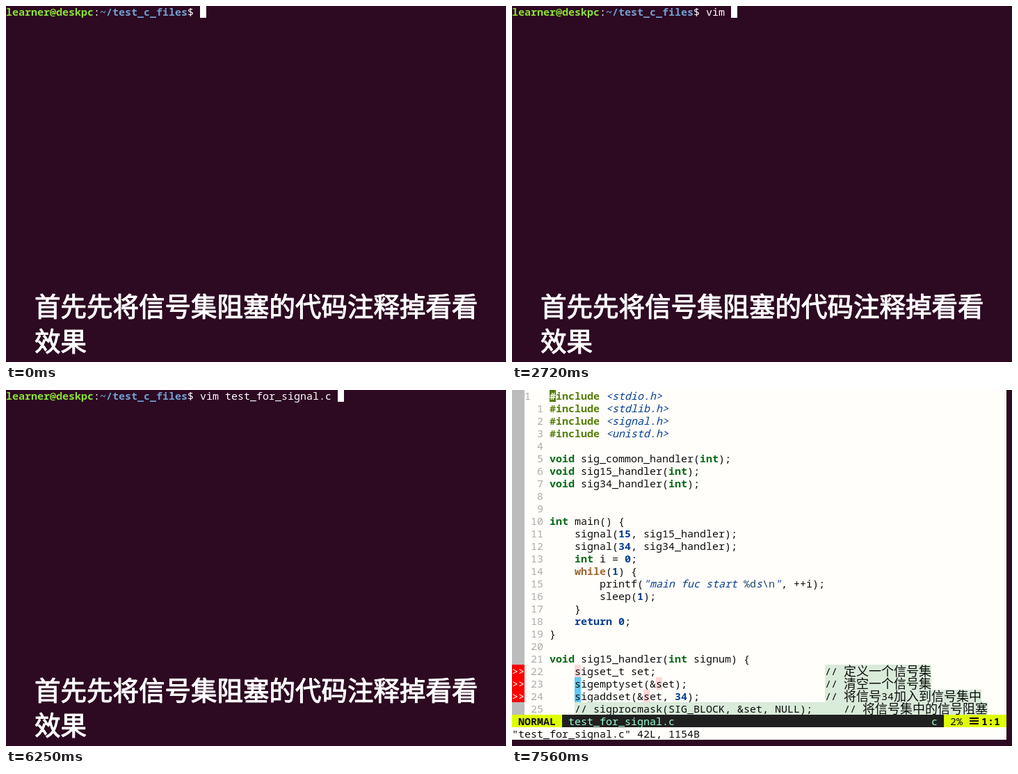
These frames come from a looping animation (719x512 px, 8 s). An HTML page with a canvas:

```html
<!DOCTYPE html>
<html lang="zh">
<head>
<meta charset="utf-8">
<title>Terminal</title>
<style>
html, body { margin: 0; width: 100%; height: 100%; overflow: hidden; background: #2d0922; }
canvas { display: block; }
</style>
</head>
<body>
<canvas id="stage" width="719" height="512"></canvas>
<script>
const ctx = document.getElementById('stage').getContext('2d');
const LOOP = 8000, CW = 9, CH = 18;
const MONO = '"Noto Sans Mono", "DejaVu Sans Mono", monospace';
const CJK = '"Noto Sans CJK SC", "Noto Sans CJK JP", sans-serif';
const DARK = '#2d0922', PAPER = '#fffefa', INK = '#0c0c0c', BLUE = '#083f93', YELLOW = '#dfff00';

const COMMAND = 'vim test_for_signal.c ';
const KEYS = [2320, 2390, 2520, 2720, 3070, 3130, 3330, 3520, 3850, 4050, 4120, 4250,
  4580, 4840, 4970, 5300, 5500, 5570, 5700, 5980, 6110, 6250];
const BACKSPACE = 7100, ENTER = 7370, CLEAR = 7430, EDITOR = 7560;
const CURSOR_OFF = [[190, 790], [1380, 1980], [6840, 7100]];
const POINTER = [[520, 628, 407], [590, 619, 365], [660, 607, 325], [720, 592, 287],
  [790, 579, 264], [920, 572, 255]];
const POINTER_END = 2250;

const STYLES = {
  plain: [INK], include: ['#557f08', 'bold'], string: [BLUE, 'italic'], escape: ['#1d4668'],
  type: ['#066a17', 'bold'], loop: ['#9c6a32', 'bold'], number: [BLUE, 'bold'], comment: [INK]
};

const CODE = String.raw`#include <stdio.h>
#include <stdlib.h>
#include <signal.h>
#include <unistd.h>

void sig_common_handler(int);
void sig15_handler(int);
void sig34_handler(int);


int main() {
    signal(15, sig15_handler);
    signal(34, sig34_handler);
    int i = 0;
    while(1) {
        printf("main fuc start %ds\n", ++i);
        sleep(1);
    }
    return 0;
}

void sig15_handler(int signum) {
    sigset_t set;                           // 定义一个信号集
    sigemptyset(&set);                      // 清空一个信号集
    sigaddset(&set, 34);                    // 将信号34加入到信号集中
    // sigprocmask(SIG_BLOCK, &set, NULL);     // 将信号集中的信号阻塞`.split('\n');

const TOKEN = /(?<comment>\/\/.*)|(?<include>#include)|(?<string><[^>]+>|"[^"]*")|(?<type>\b(?:void|int)\b)|(?<loop>\bwhile\b)|(?<number>\b(?:\d+|return)\b)/g;

const isWide = ch => ch > '\u2fff';
const columns = s => [...s].reduce((n, ch) => n + (isWide(ch) ? 2 : 1), 0);

function rect(x, y, w, h, color) {
  ctx.fillStyle = color;
  ctx.fillRect(x, y, w, h);
}

function cells(col, row, count, color) {
  rect(col * CW, row * CH - 1, count * CW, CH, color);
}

// Draws text on the character grid and returns the next column.
function put(text, col, row, color, face = '') {
  ctx.fillStyle = color;
  for (const ch of text) {
    const wide = isWide(ch);
    ctx.font = wide ? `${face} 18px ${CJK}` : `${face} 15px ${MONO}`;
    ctx.fillText(ch, col * CW, row * CH + (wide ? 15 : 14));
    col += wide ? 2 : 1;
  }
  return col;
}

function tokens(line) {
  const out = [];
  let last = 0;
  for (const m of line.matchAll(TOKEN)) {
    out.push(['plain', line.slice(last, m.index)]);
    const kind = Object.keys(m.groups).find(k => m.groups[k]);
    if (kind === 'string') {
      m[0].split(/(%d|\\n)/).forEach((s, i) => out.push([i % 2 ? 'escape' : 'string', s]));
    } else {
      out.push([kind, m[0]]);
    }
    last = m.index + m[0].length;
  }
  out.push(['plain', line.slice(last)]);
  return out;
}

const LINES = CODE.map(tokens);

function drawCaption() {
  ctx.font = `37.5px ${CJK}`;
  ctx.fillStyle = ctx.strokeStyle = '#fff';
  ctx.lineWidth = 1.1;
  ctx.lineJoin = 'round';
  ['首先先将信号集阻塞的代码注释掉看看', '效果'].forEach((text, i) => {
    const y = 445.5 + i * 50;
    ctx.fillText(text, 41, y);
    ctx.strokeText(text, 41, y);
  });
}

function drawPointer(t) {
  if (t < POINTER[0][0] || t >= POINTER_END) return;
  const [, x, y] = POINTER.filter(p => p[0] <= t).pop();
  rect(x, y - 6, 1, 13, '#e8e4e7');
  for (const dy of [-7, 7]) {
    rect(x - 2, y + dy, 2, 1, '#e8e4e7');
    rect(x + 1, y + dy, 2, 1, '#e8e4e7');
  }
}

function drawShell(t) {
  put('learner@deskpc', 0, 0, '#8ae234', 'bold');
  put(':', 14, 0, '#fff');
  put('~/test_c_files', 15, 0, '#729fcf', 'bold');
  put('$', 29, 0, '#fff');
  const typed = KEYS.filter(k => k <= t).length - (t >= BACKSPACE ? 1 : 0);
  const end = put(COMMAND.slice(0, typed), 31, 0, '#fff');
  if (t >= ENTER) cells(0, 1, 1, '#fff');
  else if (!CURSOR_OFF.some(([a, b]) => t >= a && t < b)) cells(end, 0, 1, '#fff');
  drawCaption();
  drawPointer(t);
}

function drawStatus() {
  cells(0, 26, 79, '#202020');
  cells(0, 26, 8, YELLOW);
  cells(69, 26, 10, YELLOW);
  put('NORMAL', 1, 26, INK, 'bold');
  put('test_for_signal.c', 9, 26, '#9cffd3');
  put('c', 67, 26, '#9cffd3');
  put('2%', 70, 26, INK);
  for (let i = 0; i < 3; i++) rect(658, 471 + i * 4, 13, 2, INK);
  put('1:1', 75, 26, INK, 'bold');
}

function drawEditor() {
  cells(0, 0, 2, '#bcbcbc');
  rect(0, 0, 18, 467, '#bcbcbc');
  for (const row of [22, 23, 24]) {
    cells(0, row, 2, '#f00');
    put('>>', 0, row, '#fff');
  }
  cells(6, 0, 1, '#557f08');
  cells(10, 22, 1, '#ffd7d7');
  cells(10, 23, 1, '#5fc9f5');
  cells(23, 23, 1, '#ffd7d7');
  cells(10, 24, 1, '#5fc9f5');
  cells(21, 24, 1, '#ffd7d7');
  LINES.forEach((line, row) => {
    put(row ? String(row).padStart(2) : '1', row ? 3 : 2, row, '#acacac');
    let col = 6;
    for (const [kind, text] of line) {
      if (kind === 'comment') cells(col, row, columns(text), '#d9ebd9');
      col = put(text, col, row, ...STYLES[kind]);
    }
  });
  put('#', 6, 0, PAPER, 'bold');
  drawStatus();
}

function draw(t) {
  rect(0, 0, 719, 512, DARK);
  if (t < CLEAR) return drawShell(t);
  rect(0, 0, 711, 503, PAPER);
  if (t >= EDITOR) drawEditor();
  put('"test_for_signal.c" 42L, 1154B', 0, 27, INK);
}

const start = performance.now();
function frame() {
  draw((performance.now() - start) % LOOP);
  requestAnimationFrame(frame);
}
frame();
</script>
</body>
</html>
```
